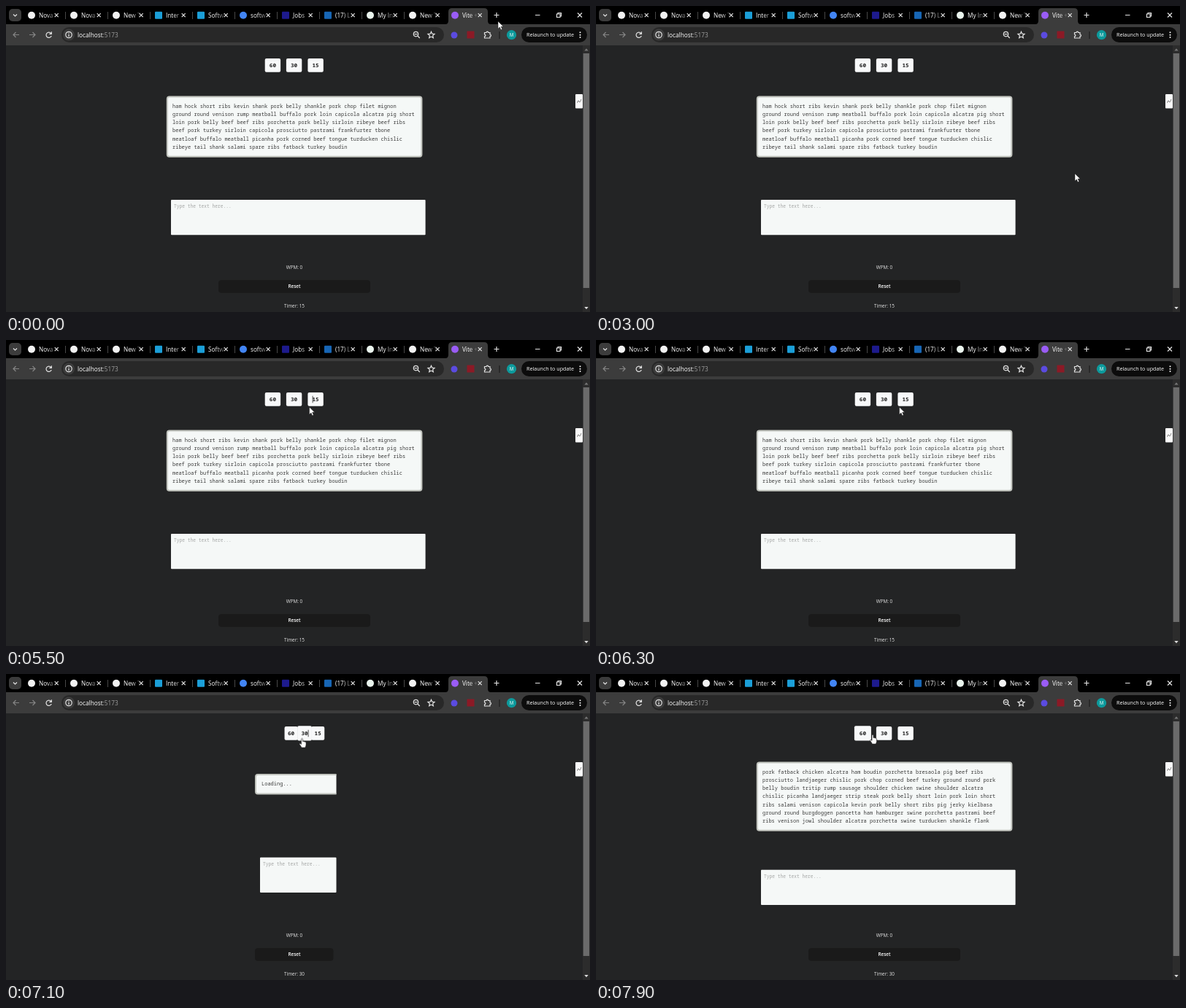
An HTML page for the animation above (8 s loop, 800 by 420 pixels).

```html
<!DOCTYPE html>
<html lang="en">
<head>
<meta charset="utf-8">
<title>Typing test</title>
<style>
html, body { margin: 0; width: 100%; height: 100%; overflow: hidden; background: #242424; }
svg { display: block; }
text { font-family: "Open Sans", sans-serif; fill: #fff; white-space: pre; }
.mono { font-family: "Noto Sans Mono", monospace; font-size: 7px; fill: #3b3b3b; }
.num { font-size: 7.7px; font-weight: 700; fill: #222; text-anchor: middle; }
.hint { font-size: 6.25px; fill: #a6a8a7; }
.label { font-size: 6.4px; text-anchor: middle; fill: #e4e4e4; }
.line { fill: none; stroke: #e3e3e3; stroke-width: 1.2; }
.dim { stroke: #858585; }
</style>
</head>
<body>
<svg width="800" height="420" viewBox="0 0 800 420">
  <defs>
    <linearGradient id="fade"><stop stop-color="#000" stop-opacity="0"/><stop offset=".6" stop-color="#000"/></linearGradient>
    <linearGradient id="fadeOn"><stop stop-color="#3c3c3c" stop-opacity="0"/><stop offset=".6" stop-color="#3c3c3c"/></linearGradient>
    <path id="arrow" d="M0 0V10.2L2.4 8 4 11.8 5.8 11 4.2 7.3H7.3Z" fill="#fff" stroke="#111" stroke-width=".5"/>
    <path id="hand" d="M-1 1Q0-.6 1 1V4.6Q2 4 2.7 4.9 3.6 4.4 4.2 5.3 5.4 5 5.5 6.4V9.4Q5.2 11 4.4 13H-.6Q-1.5 11-3.4 8.4-3.7 7-2.5 7.2L-1 8.4Z" fill="#fff" stroke="#222" stroke-width=".6"/>
  </defs>
  <rect width="800" height="25"/>
  <rect y="25" width="800" height="29" fill="#3c3c3c"/>
  <path d="M602 25Q606 25 606 20V8Q606 3 611 3H655Q660 3 660 8V20Q660 25 664 25Z" fill="#3c3c3c"/>
  <rect x="4" y="4" width="17" height="17" rx="5" fill="#3c3c3c"/>
  <path class="line" d="M10 11.5 12.5 14 15 11.5M672 9V16M668.5 12.5H675.5M725 12.5H731.5M783 9.5 789 15.5M789 9.5 783 15.5M754.5 11H759V15.5H754.5ZM756 11V9.5H760.5V14H759"/>
  <g id="tabs"></g>

  <path class="line dim" d="M18 39.5H10M13.5 36 10 39.5 13.5 43M32 39.5H40M36.5 36 40 39.5 36.5 43"/>
  <path class="line" d="M61.6 37.4A3.7 3.7 0 1 0 62.2 41M62.3 35.3V38.3H59.3"/>
  <rect x="76" y="29" width="524" height="21" rx="10.5" fill="#282828"/>
  <circle cx="86" cy="39.5" r="8" fill="#3c3c3c"/>
  <path class="line" d="M86 38.8V42M86 36.7V37.7"/>
  <circle class="line" cx="86" cy="39.5" r="4.2" stroke-width="1"/>
  <text x="98" y="42.6" font-size="8.25">localhost<tspan fill="#a0a0a0">:5173</tspan></text>
  <path class="line" d="M563.8 41 566.8 44M559.5 38.6H563.5M582.5 35.2 583.8 38.2 587 38.5 584.6 40.6 585.3 43.8 582.5 42.1 579.7 43.8 580.4 40.6 578 38.5 581.2 38.2Z"/>
  <circle class="line" cx="561.5" cy="38.6" r="3.2"/>
  <circle cx="614" cy="40" r="4.5" fill="#5b4be0"/>
  <rect x="631.5" y="34.5" width="10" height="10" fill="#8c1a26"/>
  <path class="line" d="M655.5 36.5H658A1.4 1.4 0 0 1 660.8 36.5H663V39A1.4 1.4 0 0 1 663 41.8V44H655.5V41.8A1.4 1.4 0 0 0 655.5 39Z"/>
  <path d="M676 35V45" stroke="#161616"/>
  <circle cx="692.5" cy="39.7" r="6.6" fill="#0d9a9c"/>
  <text x="692.5" y="42" font-size="6.2" text-anchor="middle">M</text>
  <rect x="706" y="29" width="90" height="21" rx="10.5" fill="#0c0c0c"/>
  <text x="713" y="42.3" font-size="7.15">Relaunch to update</text>
  <g fill="#fff"><circle cx="786.5" cy="36.3" r="1"/><circle cx="786.5" cy="39.7" r="1"/><circle cx="786.5" cy="43.1" r="1"/></g>

  <rect y="54" width="800" height="366" fill="#232425"/>
  <rect x="790" y="54" width="10" height="366" fill="#2c2c2c"/>
  <rect x="790.7" y="65" width="8.3" height="322" fill="#6b6b6b"/>
  <path d="M792.3 61.5H797.7L795 58.3Z" fill="#777"/>
  <path d="M792.3 413H797.7L795 416.2Z" fill="#ddd"/>
  <rect x="780" y="121" width="10" height="19.5" rx="1" fill="#fafafa"/>
  <path d="M782.5 133Q784 128 785 131T788 128" fill="none" stroke="#666" stroke-width=".8"/>
  <text class="label" x="395" y="361">WPM: 0</text>
  <g id="page"></g>
</svg>
<script>
const $ = id => document.getElementById(id);
const PAPER = '#f5f8f7';

// label, icon colour, round icon?
const tabs = [
  ['Nova', '#f2f2f2', 1], ['Nova', '#f2f2f2', 1], ['New T', '#f2f2f2', 1],
  ['Inter', '#1b9fd8'], ['Softw', '#1b9fd8'], ['softw', '#4285f4', 1],
  ['Jobs', '#1d1a8c'], ['(17) L', '#1766b5'], ['My In', '#eaf5ee', 1],
  ['New T', '#f2f2f2', 1], ['Vite +', '#9a5cf5', 1]
];
$('tabs').innerHTML = tabs.map(([name, color, round], i) => {
  const x = 58 * i, on = i == 10;
  return `<rect x="${x + 30}" y="7.7" width="10" height="10" rx="${round ? 5 : 1}" fill="${color}"/>
    <text x="${x + 45}" y="16" font-size="8.2">${name}</text>
    <rect x="${x + 55}" y="5" width="${on ? 20 : 26}" height="16" fill="url(#fade${on ? 'On' : ''})"/>
    <path class="line" d="M${x + 66.7} 10.2l5 5m0-5l-5 5"/>` +
    (i < 9 ? `<path d="M${x + 81.5} 8V18" stroke="#474747"/>` : '');
}).join('');

const first = `ham hock short ribs kevin shank pork belly shankle pork chop filet mignon
ground round venison rump meatball buffalo pork loin capicola alcatra pig short
loin pork belly beef beef ribs porchetta pork belly sirloin ribeye beef ribs
beef pork turkey sirloin capicola prosciutto pastrami frankfurter tbone
meatloaf buffalo meatball picanha pork corned beef tongue turducken chislic
ribeye tail shank salami spare ribs fatback turkey boudin`.split('\n');
const second = `pork fatback chicken alcatra ham boudin porchetta bresaola pig beef ribs
prosciutto landjaeger chislic pork chop corned beef turkey ground round pork
belly boudin tritip rump sausage shoulder chicken swine shoulder alcatra
chislic picanha landjaeger strip steak pork belly short loin pork loin short
ribs salami venison capicola kevin pork belly short ribs pig jerky kielbasa
ground round burgdoggen pancetta ham hamburger swine porchetta pastrami beef
ribs venison jowl shoulder alcatra porchetta swine turducken shankle flank`.split('\n');

// time, x, y of the pointer tip
const path = [
  [0, 674, 21], [1000, 674, 21], [1500, 673, 26], [1700, 673, 26], [1900, 664, 253],
  [2200, 664, 253], [2600, 692, 228], [3000, 656, 230], [3200, 656, 230], [3300, 648, 229],
  [3400, 648, 229], [3500, 600, 222], [3800, 600, 222], [4000, 415.5, 92], [6400, 415.5, 92],
  [6800, 405.5, 88], [7300, 405.5, 88], [7400, 374, 86], [7600, 374, 85],
  [7700, 375.3, 82.5], [7800, 375.3, 82.5], [7900, 379, 83], [8000, 379, 83]
];
const CLICK = 6900, LOAD = 7100, DONE = 7900, BLINK = 533.3;

function pointer(t) {
  const i = path.findIndex(p => p[0] > t);
  const [t0, x0, y0] = path[i - 1], [t1, x1, y1] = path[i], k = (t - t0) / (t1 - t0);
  return [x0 + (x1 - x0) * k, y0 + (y1 - y0) * k];
}

const rect = (x, y, w, h, fill, rx = 0) =>
  `<rect x="${x}" y="${y}" width="${w}" height="${h}" rx="${rx}" fill="${fill}"/>`;
const text = (x, y, cls, s) => `<text x="${x}" y="${y}" class="${cls}">${s}</text>`;

function button(label, cx, w, hover) {
  const g = hover ? .8 : 0;
  return rect(cx - w / 2 - g, 72 - g, w + 2 * g, 18.7 + 2 * g, '#f8f9fa', 2) +
    text(cx, 84.2, 'mono num', label);
}

function textBox(lines, top, height) {
  return `<rect x="220.8" y="${top + 1}" width="348.6" height="${height - 2}" rx="3" fill="${PAPER}" stroke="#c2c5bf" stroke-width="2"/>` +
    lines.map((s, i) => text(228, top + 16.1 + i * 11.25, 'mono', s)).join('');
}

function field(x, y, w) {
  return rect(x, y, w, 48.3, PAPER, 1) + text(x + 4, y + 11.2, 'mono hint', 'Type the text here...');
}

function draw(t) {
  const loading = t >= LOAD && t < DONE, clicked = t >= CLICK;
  const [x, y] = pointer(t);
  const hover = t >= DONE ? '60' : t >= 6800 && t < 7400 ? '30' : '';
  const centers = loading ? [390.6, 409, 427.2] : [365.4, 394.6, 424.1];
  let out = ['60', '30', '15'].map((s, i) =>
    button(s, centers[i], loading ? 18.1 : 21.4, s == hover)).join('');

  const phase = clicked ? (t - CLICK) / BLINK : (t - 167 + 2 * BLINK) / BLINK;
  if (Math.floor(phase + .001) % 2 == 0)
    out += rect(clicked ? centers[1] + 4.7 : centers[2] - 4.4, 76.7, .8, 9.6, '#222');

  if (loading) {
    out += `<path d="M452.5 138H345Q342 138 342 141V161.5Q342 164.5 345 164.5H452.5" fill="${PAPER}" stroke="#c2c5bf" stroke-width="2"/>` +
      text(350, 153.4, 'mono', 'Loading...') + field(348, 251.7, 104.5);
  } else if (clicked && t >= DONE) {
    out += textBox(second, 120.6, 95.2) + field(226, 268.8, 348.6);
  } else {
    out += textBox(first, 123.5, 84.2) + field(226, 265.9, 348.6);
  }
  out += loading ? rect(341, 376.3, 107.5, 17.4, '#1a1a1a', 4) : rect(291, 376.3, 208, 17.4, '#1a1a1a', 4);
  out += `<text class="label" x="395" y="387.4" style="font-weight:600;fill:#fff">Reset</text>` +
    text(395, 414, 'label', 'Timer: ' + (clicked ? 30 : 15)) +
    `<use href="#${hover ? 'hand' : 'arrow'}" x="${x}" y="${y}"/>`;
  $('page').innerHTML = out;
}

// The screen is sampled ten times a second.
let shown = -1;
const start = performance.now();
function frame() {
  const t = Math.floor((performance.now() - start) % 8000 / 100) * 100;
  if (t != shown) draw(shown = t);
  requestAnimationFrame(frame);
}
frame();
</script>
</body>
</html>
```
